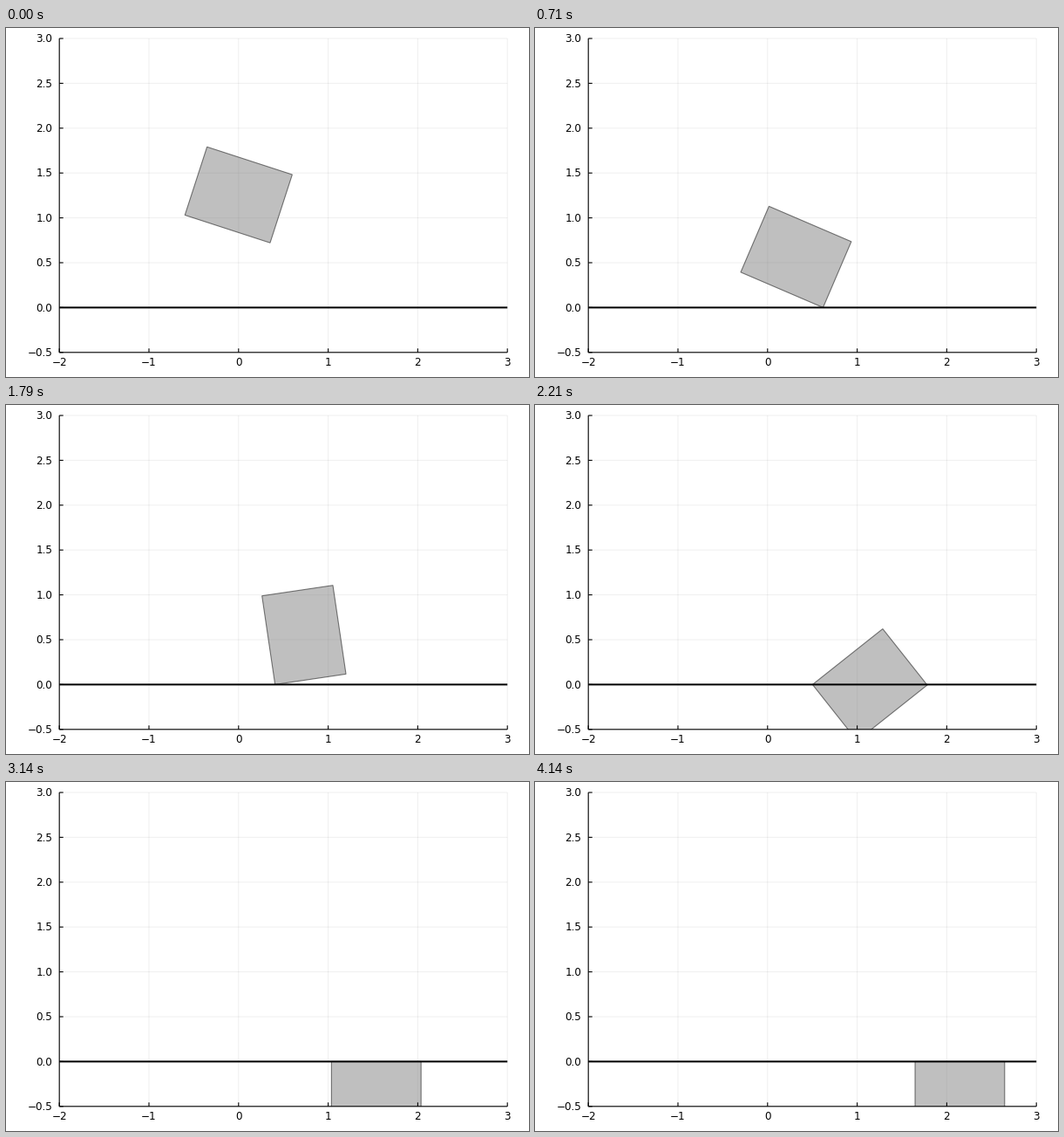
These frames come from a looping animation (600 by 400 pixels, 4.21 s). A matplotlib script:

```python
import numpy as np
import matplotlib.pyplot as plt
from matplotlib.animation import FuncAnimation
from matplotlib.collections import LineCollection
from matplotlib.patches import Polygon, Rectangle

W, H, DPI = 600, 400, 100
PX = 72 / DPI                 # one pixel in points
SCALE = 102.8                 # pixels per unit
X0, Y0 = 266.8, 320.4         # pixel position of the point (0, 0)
LOOP, TICK, FPS = 4210, 10, 14

HALF_W, HALF_H = 0.5, 0.4
G, DT = 9.81, 0.05
START_Y, START_TILT = 1.2565, 18

# Stages of the fall: start and length in steps, then the tilt (degrees,
# clockwise) and centre x reached at the end, each with its easing power
STAGES = [
    (0, 7.52, 22.9, 1, 0.313, 1),           # free fall
    (9, 8, 29.8, 1.5, 0.414, 1.5),          # corner slides forward
    (18, 7, 81.6, 1.5, 0.73, 1.2),          # tips over, corner slips back
    (25, 2, 101.9, 1, 0.871, 1),
    (28, 5.35, 180, 1.17, 1.354, 1),        # swings below the floor
    (37, 8, 180, 1, 1.568, 1.18),           # slides off upside down
    (45, 13, 180, 1, 2.146, 1),
]


def to_px(x, y):
    return X0 + SCALE * x, Y0 - SCALE * y


def pose(step):
    tilt, x = START_TILT, 0
    for start, length, tilt_end, tilt_pow, x_end, x_pow in STAGES:
        u = np.clip((step - start) / length, 0, 1)
        tilt += (tilt_end - tilt) * u ** tilt_pow
        x += (x_end - x) * u ** x_pow
    return np.radians(tilt), x


def box_corners(step):
    tilt, cx = pose(step)
    c, s = np.cos(tilt), np.sin(tilt)
    falling = START_Y - G * (DT * step) ** 2 / 2
    resting = HALF_W * s + HALF_H * c       # lower right corner on the floor
    cy = max(falling, resting)
    signs = [(-1, 1), (1, 1), (1, -1), (-1, -1)]
    return [to_px(cx + u * HALF_W * c + v * HALF_H * s,
                  cy - u * HALF_W * s + v * HALF_H * c) for u, v in signs]


fig = plt.figure(figsize=(W / DPI, H / DPI), dpi=DPI, facecolor="white")
ax = fig.add_axes([0, 0, 1, 1])
ax.set_xlim(0, W)
ax.set_ylim(H, 0)
ax.axis("off")

left, top = to_px(-2, 3)
right, bottom = to_px(3, -0.5)


def add_lines(segments, width, z, alpha=1):
    ax.add_collection(LineCollection(segments, linewidths=width * PX,
                                     colors="black", alpha=alpha,
                                     zorder=z, snap=False), autolim=False)


def label(x, y, text, align):
    ax.text(x, y, text.replace("-", "\u2212"), ha=align, va="baseline",
            family="DejaVu Sans", size=12 * PX, color="black")


grid, ticks = [], []
for v in range(-2, 4):
    x = to_px(v, 0)[0]
    grid.append([(x, top), (x, bottom)])
    ticks.append([(x, bottom), (x, bottom - 4.5)])
    label(x, 387, f"{v}", "center")
for v in np.arange(-0.5, 3.1, 0.5):
    y = to_px(0, v)[1]
    grid.append([(left, y), (right, y)])
    ticks.append([(left, y), (left + 4.5, y)])
    label(53.4, y + 4.2, f"{v:.1f}", "right")

add_lines(grid, 1, 1, alpha=0.06)
add_lines(ticks, 1.1, 4)
add_lines([[(left, top), (left, bottom)], [(left, bottom), (right, bottom)]],
          1.1, 4)
add_lines([[(left, Y0), (right, Y0)]], 2, 3)

box = Polygon(box_corners(0), closed=True, facecolor=(0.5, 0.5, 0.5, 0.5),
              edgecolor=(0, 0, 0, 0.5), linewidth=1.1 * PX, zorder=2,
              joinstyle="miter", snap=False)
ax.add_patch(box)
box.set_clip_path(Rectangle((left, top), right - left, bottom - top,
                            transform=ax.transData))


def update(tick):
    step = int((tick + 0.5) * TICK * FPS / 1000)
    box.set_xy(box_corners(step))
    return [box]


anim = FuncAnimation(fig, update, frames=LOOP // TICK, interval=TICK,
                     repeat=True, repeat_delay=0, blit=False)
plt.show()
```
